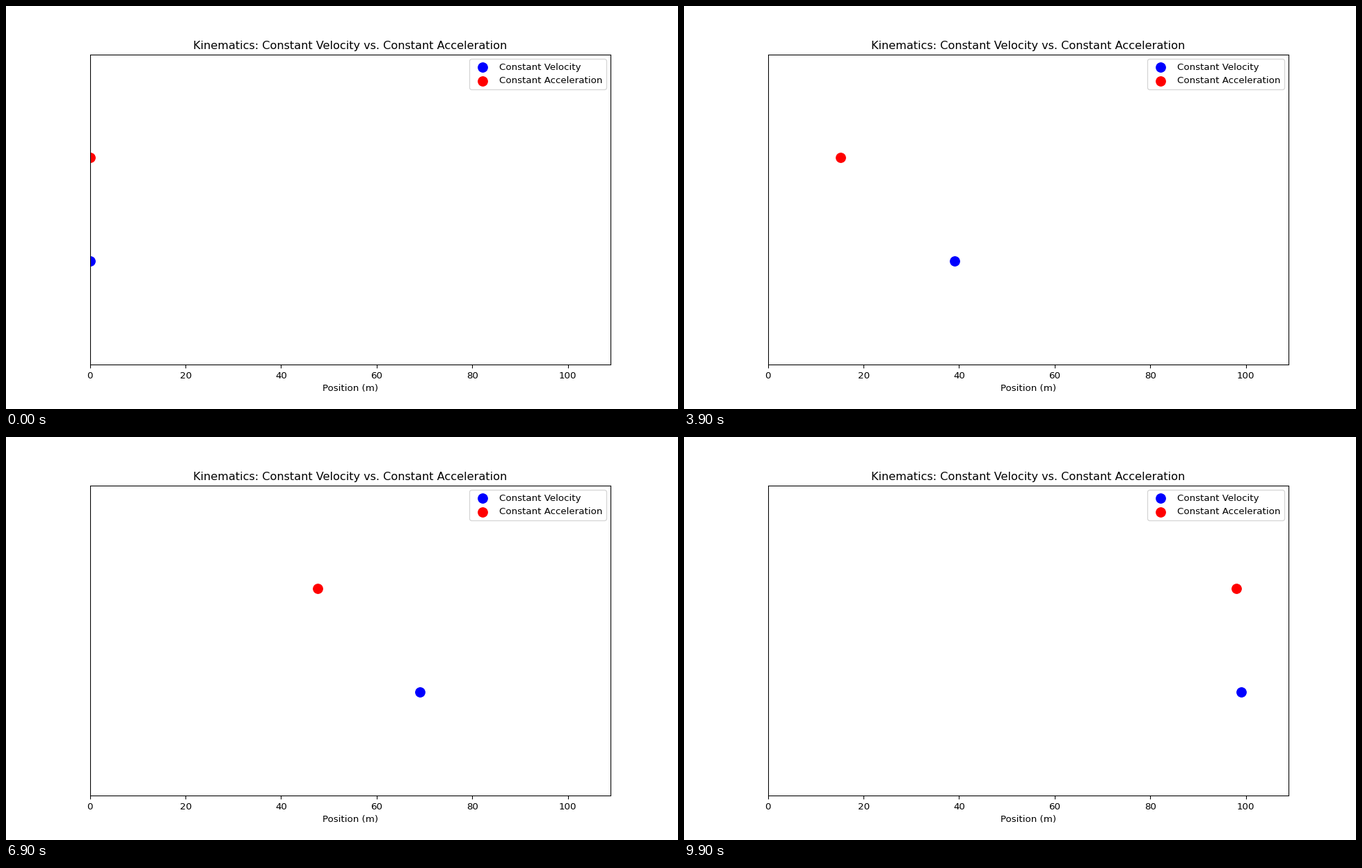
Animation, 966 px wide and 580 px high, one loop 10 s. Source, as a matplotlib script:

```python
import matplotlib.pyplot as plt
import numpy as np
from matplotlib.animation import FuncAnimation

DPI = 96.6
SPEED = 10.0  # m/s
ACCEL = 2.0   # m/s^2
STEP = 0.1    # s
FRAMES = 100

times = np.arange(FRAMES) * STEP
steady = SPEED * times
speeding = 0.5 * ACCEL * times**2

# Height is a hair over 580 px so that it never truncates to 579.
fig, ax = plt.subplots(figsize=(10, 580.001 / DPI), dpi=DPI)
ax.set_xlim(0, max(steady[-1], speeding[-1]) + 10)
ax.set_ylim(0, 3)
ax.set_yticks([])
ax.set_xlabel("Position (m)")
ax.set_title("Kinematics: Constant Velocity vs. Constant Acceleration")

blue = ax.scatter([0], [1], s=100, color="blue", label="Constant Velocity")
red = ax.scatter([0], [2], s=100, color="red", label="Constant Acceleration")
ax.legend(loc="upper right")


def update(i):
    blue.set_offsets([[steady[i], 1]])
    red.set_offsets([[speeding[i], 2]])
    return blue, red


anim = FuncAnimation(fig, update, frames=FRAMES, interval=STEP * 1000,
                     repeat=True, repeat_delay=0)
plt.show()
```
